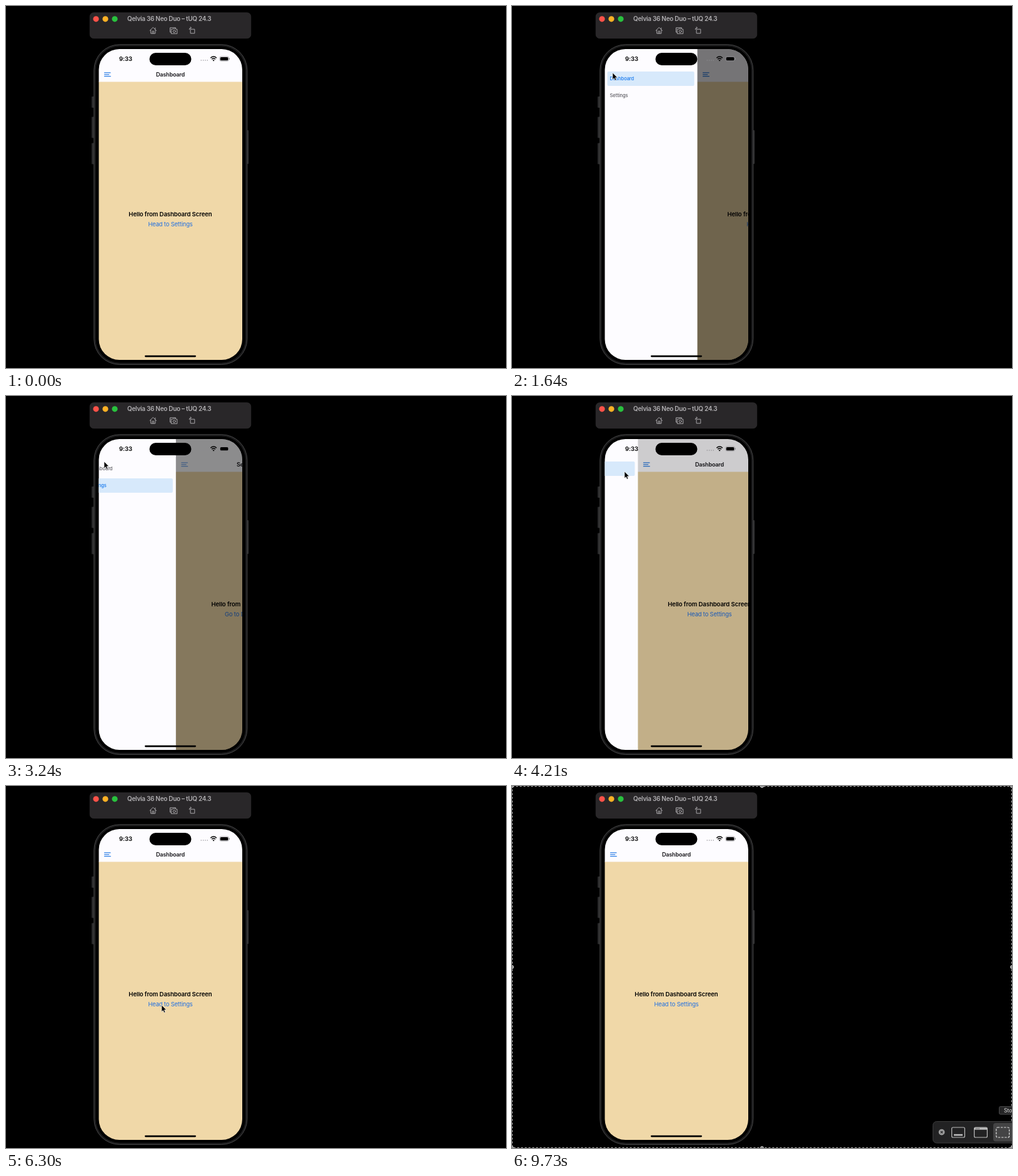
These frames come from a looping animation (800 px wide and 580 px high, 9.97 s). An HTML page:

```html
<!DOCTYPE html>
<html lang="en">
<head>
<meta charset="utf-8">
<title>Drawer navigation</title>
<style>
  html, body { margin: 0; width: 100%; height: 100%; overflow: hidden; background: #000; }
  svg { display: block; width: 800px; height: 580px; font-family: Inter, "Liberation Sans", sans-serif; }
  .mid { text-anchor: middle; }
  .head { font-size: 9.08px; font-weight: 600; letter-spacing: -.2px; fill: #17161a; }
  .hello { font-size: 9.6px; font-weight: 600; letter-spacing: -.1px; }
  .link { font-size: 9.4px; letter-spacing: -.15px; fill: #1f6fe2; }
  .item { font-size: 7.5px; font-weight: 500; letter-spacing: -.06px; }
  .line { fill: none; stroke: #aaa8ab; stroke-width: 1; stroke-linejoin: round; stroke-linecap: round; }
  .tool { fill: none; stroke: #bdbdbd; stroke-width: 1.2; }
</style>
</head>
<body>
<svg viewBox="0 0 800 580">
  <defs>
    <clipPath id="screen"><rect x="148.5" y="69" width="229.5" height="498" rx="33"/></clipPath>
  </defs>
  <rect width="800" height="580"/>

  <!-- simulator title bar -->
  <rect x="134.2" y="10.7" width="257.6" height="41.1" rx="6" fill="#292729" stroke="#363437" stroke-width=".6"/>
  <circle cx="144" cy="20.8" r="4.6" fill="#ff5249"/>
  <circle cx="159" cy="20.8" r="4.6" fill="#fdb125"/>
  <circle cx="174" cy="20.8" r="4.6" fill="#29c23e"/>
  <text x="194" y="24.2" font-size="10" font-weight="600" letter-spacing="-.3" fill="#b2b0b3">Qelvia 36 Neo Duo – tUQ 24.3</text>
  <g class="line">
    <path d="M230 39.5 235.3 34.3 240.6 39.5M231.7 38.5V44h7.2V38.5M234.2 44V40.2h2.2V44M238.8 35v2"/>
    <path d="M264.5 42H262.5V34.8h9V36M264.7 37.2h2l.9-1.1h3.2l.9 1.1h2.1v7.1h-9.1z"/>
    <circle cx="269.2" cy="40.6" r="2"/>
    <path d="M295.5 37.2h6.3v6.6h-6.3zM293.2 37.5q0-2.6 2.6-2.6M295 33.4l1.4 1.4-1.4 1.5"/>
  </g>

  <!-- phone body -->
  <g fill="#2b2b2c">
    <rect x="137" y="145" width="5" height="18" rx="1"/>
    <rect x="137" y="177.5" width="5" height="34" rx="1"/>
    <rect x="137" y="219.5" width="5" height="34" rx="1"/>
    <rect x="384" y="199" width="4.4" height="54" rx="1"/>
  </g>
  <rect x="140.8" y="61.8" width="245" height="512.6" rx="41" fill="#161617" stroke="#4a4a4b"/>
  <rect x="143" y="64" width="240.6" height="508.2" rx="39" fill="#000" stroke="#262627" stroke-width=".8"/>

  <g clip-path="url(#screen)">
    <g id="page">
      <rect x="148" y="69" width="231" height="53" fill="#fdfcff"/>
      <rect x="148" y="121.5" width="231" height="446" fill="#f0d8a8"/>
      <path id="menu" d="M157.5 106.9H167M157.5 109.8H164.8M157.5 112.7H167.3" stroke="#2f80e6" stroke-width="1.3" stroke-linecap="round"/>
      <text id="title" class="mid head" x="263" y="113"></text>
      <text id="hello" class="mid hello" x="263" y="337.4"></text>
      <text id="link" class="mid link" x="263" y="353.3"></text>
      <rect id="shade" x="148" y="69" width="231" height="499"/>
    </g>
    <g id="drawer">
      <rect x="148" y="69" width="149" height="499" fill="#fdfcff"/>
      <rect id="active" x="153" y="105" width="139" height="23" rx="2" fill="#d7e9fb"/>
      <text id="item0" class="item" x="157" y="119.2">Dashboard</text>
      <text id="item1" class="item" x="157" y="146.2">Settings</text>
    </g>
  </g>

  <!-- status bar and home indicator -->
  <rect x="229.5" y="75" width="67" height="20" rx="10"/>
  <text x="181" y="88.2" font-size="9.6" font-weight="600" letter-spacing="-.1">9:33</text>
  <path d="M312.3 87H323" stroke="#8d8c90" stroke-width="1.5" stroke-linecap="round" stroke-dasharray="0 3.3"/>
  <g fill="none" stroke="#000" stroke-width="1.5">
    <path d="M327.3 83.2q4.8-4.3 9.6 0M329.2 85.3q2.9-2.5 5.8 0"/>
    <path d="M332.1 88.6 330.5 86.9q1.6-1.3 3.2 0z" fill="#000" stroke="none"/>
  </g>
  <rect x="341.8" y="81" width="14.6" height="7.2" rx="2.3" fill="none" stroke="#8d8c90" stroke-width=".7"/>
  <rect x="342.8" y="82" width="12.6" height="5.2" rx="1.5"/>
  <path d="M357.5 83.5v2.2" stroke="#8d8c90"/>
  <rect x="222" y="559.7" width="82" height="2.7" rx="1.35"/>

  <!-- screen capture overlay -->
  <g id="capture">
    <rect x=".5" y=".5" width="799" height="579" fill="none" stroke="#bcbcbc" stroke-dasharray="3 3"/>
    <g id="handles" fill="#8c8c8c" stroke="#d8d8d8" stroke-width=".8"></g>
    <rect x="673.5" y="537.5" width="150" height="34.5" rx="6" fill="#222223" stroke="#3c3c3d"/>
    <circle cx="687.5" cy="554.6" r="4.9" fill="#9c9c9c"/>
    <path d="M685.7 552.8l3.6 3.6m0-3.6l-3.6 3.6" stroke="#222223" stroke-width="1.1"/>
    <rect class="tool" x="703.6" y="547" width="20.8" height="16" rx="2"/>
    <rect x="707" y="557.8" width="14" height="2.6" fill="#bdbdbd"/>
    <rect class="tool" x="739.6" y="547" width="20.8" height="16" rx="2"/>
    <path d="M740 549H760" stroke="#bdbdbd" stroke-width="3.4"/>
    <path d="M742 549h6" stroke="#222223" stroke-width="1.2" stroke-dasharray="1.2 1.1"/>
    <rect x="770" y="540" width="40" height="29.5" rx="4" fill="#444445"/>
    <rect class="tool" x="774.8" y="547" width="20.8" height="16" rx="2" stroke-dasharray="3.4 1.8" style="stroke:#e0e0e0"/>
  </g>
  <g id="tip">
    <rect x="779.5" y="513.6" width="75" height="12.4" rx="2" fill="#252526" stroke="#4b4b4c"/>
    <text x="787" y="522.8" font-size="8.6" fill="#e4e4e4">Stop Recording</text>
  </g>

  <path id="cursor" d="M0 0V10.8L2.4 8.6 4 12.2 5.9 11.4 4.3 7.8H7.6Z" stroke="#fff" stroke-opacity=".85" stroke-width=".7" stroke-linejoin="round"/>
</svg>

<script>
const LOOP = 9970, WIDTH = 148.5, DIM = 0.54, OMEGA = 18.26;
const $ = id => document.getElementById(id);
const ui = {};
for (const id of ['page', 'menu', 'title', 'hello', 'link', 'shade', 'drawer',
  'active', 'item0', 'item1', 'capture', 'tip', 'cursor']) ui[id] = $(id);

const screens = [
  { title: 'Dashboard', hello: 'Hello from Dashboard Screen', link: 'Head to Settings' },
  { title: 'Settings', hello: 'Hello from Setting Screen', link: 'Go to Dashboard' }
];

const slides = [[1200, 1], [2177, 0], [3065, 1], [4091, 0]];
const presses = [5270, 6010, 6520, 7300];
const HOLD = 130;
const switches = [2177, 4091, ...presses.map(t => t + HOLD)];

// time, x, y of the pointer tip
const path = [
  [180, 414, 252], [360, 178, 87], [520, 178, 87], [820, 161, 107],
  [1660, 161, 107], [2040, 170, 138], [2380, 170, 138], [2860, 157, 105],
  [3280, 157, 105], [3900, 180, 121], [4320, 180, 121], [4950, 249, 351],
  [8300, 249, 351], [8700, 830, 556]
];

const clamp = v => Math.min(1, Math.max(0, v));
const ease = v => v * v * (3 - 2 * v);
const move = (el, x, y = 0) => el.setAttribute('transform', `translate(${x} ${y})`);

$('handles').innerHTML = [[0, 0], [400, 0], [800, 0], [0, 290], [800, 290], [0, 580], [400, 580], [800, 580]]
  .map(([x, y]) => `<circle cx="${x}" cy="${y}" r="2.6"/>`).join('');

// critically damped spring between open and closed
function drawerAt(t) {
  let p = 0;
  for (const [start, to] of slides) {
    if (t < start) break;
    const u = OMEGA * (t - start) / 1000;
    p = to + (1 - 2 * to) * (1 + u) * Math.exp(-u);
  }
  return p;
}

function menuOpacity(t) {
  for (const [start, open] of slides) {
    if (!open || t < start - 100 || t > start + 350) continue;
    return t < start ? 1 - .7 * clamp((t - start + 100) / 100)
                     : .3 + .7 * ease((t - start) / 350);
  }
  return 1;
}

function linkOpacity(t) {
  const start = presses.find(s => t >= s && t < s + HOLD);
  return start === undefined ? 1 : 1 - .8 * ease((t - start) / HOLD);
}

function cursorAt(t) {
  const i = path.findIndex(k => k[0] > t);
  if (i < 0) return path[path.length - 1].slice(1);
  const [t0, x0, y0] = path[i - 1], [t1, x1, y1] = path[i];
  const k = ease((t - t0) / (t1 - t0));
  return [x0 + (x1 - x0) * k, y0 + (y1 - y0) * k];
}

let shown = -1;
function show(n) {
  if (n === shown) return;
  shown = n;
  for (const key in screens[n]) ui[key].textContent = screens[n][key];
  ui.active.setAttribute('y', 105 + 27 * n);
  [ui.item0, ui.item1].forEach((el, i) => el.setAttribute('fill', i === n ? '#1578ee' : '#5c5b60'));
}

function draw(t) {
  show(switches.filter(s => t >= s).length % 2);
  const p = drawerAt(t);
  move(ui.page, p * WIDTH);
  move(ui.drawer, (p - 1) * WIDTH);
  ui.shade.setAttribute('opacity', p * DIM);
  ui.menu.setAttribute('opacity', menuOpacity(t));
  ui.link.setAttribute('opacity', linkOpacity(t));
  ui.capture.setAttribute('opacity', t >= 8270 ? 1 : 0);
  ui.tip.setAttribute('opacity', clamp((t - 9520) / 200));
  ui.cursor.setAttribute('opacity', t < 180 ? 0 : 1);
  if (t >= 180) move(ui.cursor, ...cursorAt(t));
}

const begin = performance.now();
function tick() {
  draw((performance.now() - begin) % LOOP);
  requestAnimationFrame(tick);
}
tick();
</script>
</body>
</html>
```
